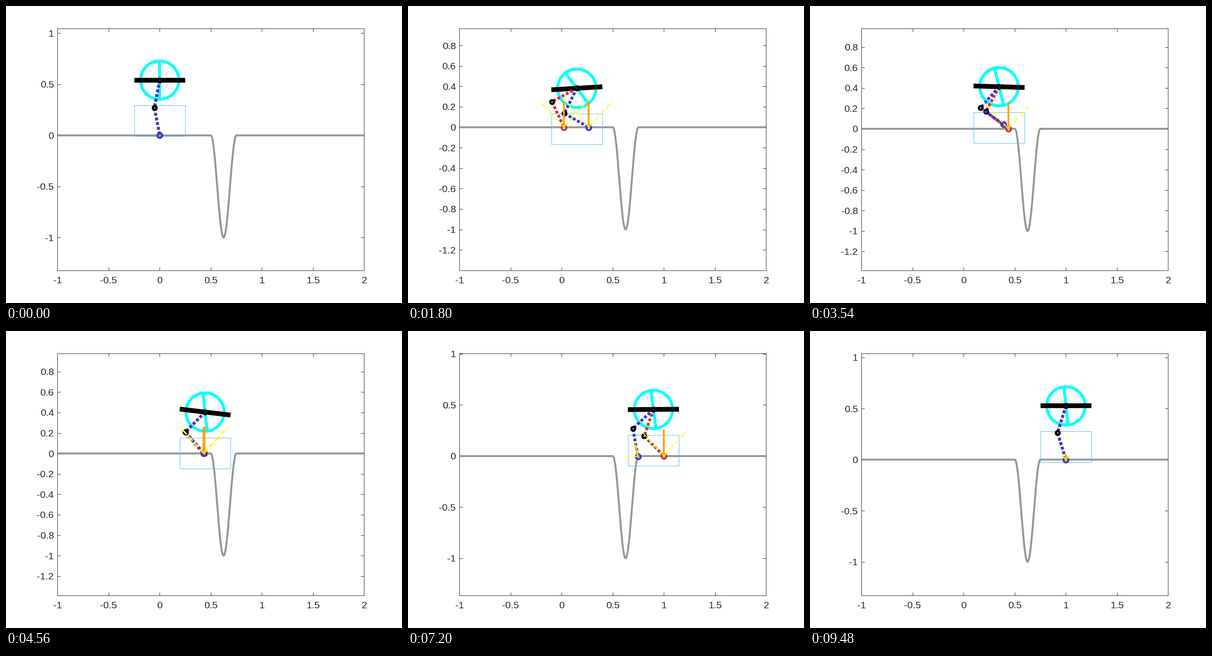
Recreate the animation shown at these times as a matplotlib script. Size 864 px wide and 648 px high, loop 9.54 s.

```python
import numpy as np
import matplotlib
import matplotlib.pyplot as plt
from matplotlib.animation import FuncAnimation
from matplotlib.patches import Rectangle

matplotlib.rcParams.update({
    "font.family": "Liberation Sans",
    "font.size": 21.4,
    "axes.unicode_minus": False,
    "lines.scale_dashes": False,
    "lines.dash_capstyle": "butt",
    "lines.solid_capstyle": "butt",
})

W, H = 864, 648
STEP_MS, FRAMES = 60, 159
END = 9.53              # the last load has faded out here
LINK = 0.2755           # thigh and shank length
RADIUS = 0.1875         # reaction wheel
HALF_VIEW = 1.184       # half height of the visible y range
MU = 0.9                # friction cone slope
LOAD = 0.26             # drawn force of a planted foot
RED, BLUE, INK = "#c83737", "#3c37cd", "#262626"

# Poses between which the body travels, tilts and spins its wheel.
POSE_T = [0, 1.8, 2.64, 4.56, 5.58, 7.2, 9.48]
BODY_X = [0, 0.148, 0.272, 0.444, 0.655, 0.897, 1]
PITCH = [0, 3.4, 2.3, -6.7, -8.7, 0.4, 0]
SPIN = [0, 37, 21.5, 6.2, -13.4, 7.6, 6.1]
# Highest and lowest points of the hip, alternating.
BOB_T = [0, 1.76, 2.6, 4.3, 5.2, 6.3, 7.25, 8.2, 9.6]
BOB_Y = [0.541, 0.381, 0.456, 0.38, 0.51, 0.381, 0.457, 0.393, 0.528]


def locate(t, times):
    """Index of the interval holding t, its length and the progress in it."""
    i = min(np.searchsorted(times, t, side="right"), len(times) - 1) - 1
    d = times[i + 1] - times[i]
    return i, d, (t - times[i]) / d


def curve(t, values):
    """Smooth Hermite curve through the poses, at rest at both ends."""
    slope = np.gradient(values, POSE_T)
    slope[0] = slope[-1] = 0
    i, d, u = locate(t, POSE_T)
    s = u * u * (3 - 2 * u)
    return (values[i] + s * (values[i + 1] - values[i])
            + u * (1 - u) * d * ((1 - u) * slope[i] - u * slope[i + 1]))


def bob(t):
    i, _, u = locate(t, BOB_T)
    return BOB_Y[i] + (BOB_Y[i + 1] - BOB_Y[i]) * (1 - np.cos(np.pi * u)) / 2


def ground(x):
    inside = (x > 0.5) & (x < 0.75)
    return np.where(inside, -0.5 * (1 - np.cos(8 * np.pi * (x - 0.5))), 0.0)


def ground_normal(x):
    slope = -4 * np.pi * np.sin(8 * np.pi * (x - 0.5)) if 0.5 < x < 0.75 else 0.0
    return np.array([-slope, 1.0]) / np.hypot(slope, 1.0)


def join(line, *points):
    line.set_data(*np.array(points).T)


class Leg:
    """A leg whose foot makes swings of (lift-off, touchdown, landing x)."""

    def __init__(self, ax, color, swings, z):
        self.swings = swings
        self.bones, = ax.plot([], [], color=color, lw=6.25, zorder=z,
                              ls=(0, (6.25, 4.15)))
        self.joints, = ax.plot([], [], "o", mfc="none", mec="black",
                               ms=8, mew=4.8, zorder=z + 0.2)
        self.sole, = ax.plot([], [], "o", mfc="none", mec=color,
                             ms=10.4, mew=4.17, zorder=z + 0.3)
        self.force, = ax.plot([], [], color="#ffa500", lw=4.17, zorder=z + 2)
        self.cone = [ax.plot([], [], color="#ffff00", lw=2.08, zorder=z + 2.2,
                             ls=(0, (12.5, 6.25)))[0] for _ in range(2)]

    def foot(self, t):
        """Foot position and its load, which ramps in and out."""
        x, landed = 0.0, 0.0
        for lift_off, touchdown, target in self.swings:
            if t < lift_off:
                break
            if t < touchdown:
                u = (t - lift_off) / (touchdown - lift_off)
                s = u * u * (3 - 2 * u)
                lift = min(0.12, 0.35 * (target - x))
                y = (1 - s) * ground(x) + s * ground(target) + 4 * lift * s * (1 - s)
                return np.array([x + s * (target - x), y]), 0.0
            x, landed = target, touchdown
        leaves = min([a for a, _, _ in self.swings if a > t], default=END)
        load = LOAD * min(1, (t - landed) / 0.12, (leaves - t) / 0.25)
        return np.array([x, float(ground(x))]), load

    def draw(self, t, hip):
        foot, load = self.foot(t)
        span = foot - hip
        dist = np.hypot(*span)
        bend = np.sqrt(max(LINK ** 2 - dist ** 2 / 4, 0))
        knee = (hip + foot) / 2 + bend * np.array([span[1], -span[0]]) / dist
        join(self.bones, hip, knee, foot)
        join(self.joints, hip, knee)
        join(self.sole, foot)

        for line in (self.force, *self.cone):
            line.set_visible(load > 0)
        normal = ground_normal(foot[0])
        along = np.array([normal[1], -normal[0]])
        push = load * np.array([0.28 * normal[0], 1])
        join(self.force, foot, foot + push)
        for line, side in zip(self.cone, (-MU, MU)):
            join(line, foot, foot + push @ normal * (normal + side * along))


fig = plt.figure(figsize=(W / 72, H / 72), dpi=72, facecolor="white")
ax = fig.add_axes([112.4 / W, 71.4 / H, 669 / W, 528 / H])
ax.set_xlim(-1, 2)
ax.set_xticks(np.arange(-1, 2.1, 0.5))
ax.xaxis.set_major_formatter("{x:.4g}")
ax.tick_params(direction="in", top=True, right=True, length=6.7, width=1,
               color=INK, labelcolor=INK)
ax.tick_params(axis="x", pad=13)
ax.tick_params(axis="y", pad=8)
for spine in ax.spines.values():
    spine.set(color=INK, linewidth=1)

gx = np.linspace(-1, 2, 1201)
ax.plot(gx, ground(gx), color="#969696", lw=4.17, zorder=2)
wheel, = ax.plot([], [], color="cyan", lw=6.25, zorder=3)
spoke, = ax.plot([], [], color="cyan", lw=6.25, zorder=3)
bar, = ax.plot([], [], color="black", lw=10.4, zorder=3.2)
box = Rectangle((0, 0), 0.5, 0.3, fill=False, ec="#4dbeee", lw=1, zorder=3.1)
ax.add_patch(box)

red = Leg(ax, RED, [(0.3, 0.84, 0.02), (2.08, 2.695, 0.4355),
                    (4.88, 5.45, 0.7494), (5.82, 6.5, 1.0)], 4)
blue = Leg(ax, BLUE, [(0.9, 1.5, 0.265), (3.0, 3.8, 0.427),
                      (4.88, 5.62, 0.7457), (7.31, 8.15, 1.0)], 5)
turn = np.linspace(0, 2 * np.pi, 121)


def rod(line, center, half, degrees):
    a = np.radians(degrees)
    arm = half * np.array([np.cos(a), np.sin(a)])
    join(line, center - arm, center + arm)


def update(i):
    t = 0.0 if i < 2 else i * STEP_MS / 1000
    x, y = hip = np.array([curve(t, BODY_X), bob(t)])
    wheel.set_data(x + RADIUS * np.cos(turn), y + RADIUS * np.sin(turn))
    rod(spoke, hip, RADIUS, 90 + curve(t, SPIN))
    rod(bar, hip, 0.25, curve(t, PITCH))
    box.set_xy((x - 0.25, y - 0.55))
    red.draw(t, hip)
    blue.draw(t, hip)

    # The view stays centred between the pit floor and the wheel top.
    middle = (y + RADIUS - 1) / 2
    low, high = middle - HALF_VIEW, middle + HALF_VIEW
    step = 0.5 if high >= 1 else 0.2
    ticks = np.arange(np.ceil(low / step), np.floor(high / step) + 1) * step
    ax.set_yticks(ticks, [f"{v + 0.0:.4g}" for v in ticks])
    ax.set_ylim(low, high)
    return []


anim = FuncAnimation(fig, update, frames=FRAMES, init_func=lambda: [],
                     interval=STEP_MS, repeat=True, repeat_delay=0, blit=False)
plt.show()
```
